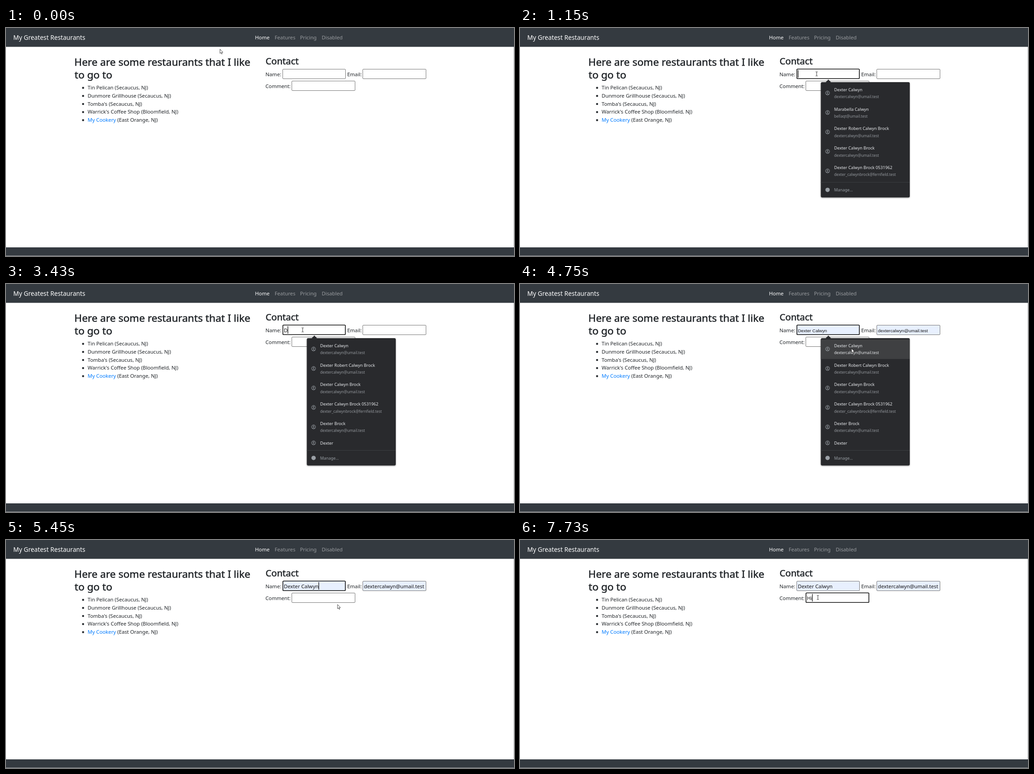
Recreate the animation shown at these times as an HTML page. Size 1117x501 px, loop 8 s.

```html
<!DOCTYPE html>
<html lang="en">
<head>
<meta charset="utf-8">
<title>Restaurants page</title>
<style>
  html, body { margin: 0; width: 100%; height: 100%; overflow: hidden; background: #fff; }
  svg { display: block; width: 1117px; height: 501px; }
  text { font-family: "Noto Sans", "Open Sans", sans-serif; font-size: 11.25px; fill: #212529; white-space: pre; }
  .head { font-weight: 500; stroke: #212529; stroke-width: .55px; }
  .preview { font-family: "Liberation Sans", Arial, sans-serif; font-size: 9.87px; }
  .popup { filter: drop-shadow(0 1px 1.5px rgba(0, 0, 0, .45)); }
</style>
</head>
<body>
<svg id="stage" viewBox="0 0 1117 501">
  <defs><clipPath id="mailClip"><rect x="785" y="90" width="137.5" height="22"/></clipPath></defs>
</svg>
<script>
const LOOP = 8000;
const stage = document.getElementById('stage');

function add(parent, tag, attrs = {}, content) {
  const el = document.createElementNS('http://www.w3.org/2000/svg', tag);
  for (const key in attrs) el.setAttribute(key, attrs[key]);
  if (content !== undefined) el.textContent = content;
  parent.append(el);
  return el;
}
const rect = (p, x, y, width, height, fill, more) => add(p, 'rect', { x, y, width, height, fill, ...more });
const label = (p, x, y, str, style = '', cls = '') => add(p, 'text', { x, y, style, class: cls }, str);
const show = (el, on) => { el.style.display = on ? '' : 'none'; };

// Page
rect(stage, 1116, 0, 1, 501, '#c9cbcd');
rect(stage, 0, 0, 1117, 41.4, '#343a40');
rect(stage, 0, 482, 1117, 18.5, '#343a40');
label(stage, 16, 26.3, 'My Greatest Restaurants', 'font-size:13.7px;fill:#fff');
[['Home', 547.5], ['Features', 590.7], ['Pricing', 646.5], ['Disabled', 694.3]].forEach(([str, x], i) =>
  label(stage, x, 25.3, str, `fill:${i ? '#999c9f' : '#fff'}`));

label(stage, 150.2, 82.7, 'Here are some restaurants that I like', 'font-size:22.55px', 'head');
label(stage, 150.8, 111.2, 'to go to', 'font-size:22.55px', 'head');
label(stage, 570.8, 80, 'Contact', 'font-size:20.1px', 'head');

['Tin Pelican (Secaucus, NJ)', 'Dunmore Grillhouse (Secaucus, NJ)', "Tomba's (Secaucus, NJ)",
 "Warrick's Coffee Shop (Bloomfield, NJ)", ' (East Orange, NJ)'].forEach((str, i) => {
  const y = 135.2 + i * 17.75;
  add(stage, 'circle', { cx: 169.5, cy: y - 3.7, r: 2.2, fill: '#212529' });
  const line = label(stage, 179.5, y, '');
  if (i === 4) add(line, 'tspan', { style: 'fill:#007bff' }, 'My Cookery');
  add(line, 'tspan', {}, str);
});

label(stage, 570.5, 105.5, 'Name:');
const mailMark = rect(stage, 750, 93, 31, 17, '#0078d7');
const mailLabel = label(stage, 750.3, 105.5, 'Email:');
label(stage, 570.5, 131.7, 'Comment:');

// Form fields
function makeField(x, y, width, clip) {
  const box = rect(stage, x + .5, y + .5, width - 1, 21, '#fff', { rx: 1.5, stroke: '#767676', 'stroke-width': 1 });
  const ring = rect(stage, x + .8, y + .3, width - 1.6, 21, 'none', { rx: 1.5, stroke: '#101010', 'stroke-width': 1.6 });
  const group = add(stage, 'g', clip ? { 'clip-path': `url(#${clip})` } : {});
  const text = label(group, x + 3, y + 15.6, '', 'fill:#151515');
  const caret = rect(stage, 0, y + 2.5, 1.2, 16.5, '#000');
  return (str, { filled, preview, focus, blink }) => {
    box.setAttribute('fill', filled ? '#e8f0fe' : '#fff');
    text.textContent = str;
    text.setAttribute('class', preview ? 'preview' : '');
    show(ring, focus);
    show(caret, blink);
    if (blink) caret.setAttribute('x', x + 3 + (str ? text.getComputedTextLength() : 0));
  };
}
const nameField = makeField(608, 90, 139);
const mailField = makeField(784, 90, 140, 'mailClip');
const commentField = makeField(628, 116, 140);

// Autofill popups
const NAME = 'Dexter Calwyn', MAIL = 'dextercalwyn@umail.test';
const people = {
  main: [NAME, MAIL],
  relative: ['Marabella Calwyn', 'bellaqt@umail.test'],
  full: ['Dexter Robert Calwyn Brock', MAIL],
  double: ['Dexter Calwyn Brock', MAIL],
  school: ['Dexter Calwyn Brock 0531962', 'dexter_calwynbrock@fernfield.test'],
  short: ['Dexter Brock', MAIL],
  first: ['Dexter']
};

function personIcon(p, x, y) {
  const g = add(p, 'g', { transform: `translate(${x} ${y})`, fill: 'none', stroke: '#9aa0a6' });
  add(g, 'circle', { r: 4.4 });
  add(g, 'circle', { cy: -1.2, r: 1.4 });
  add(g, 'path', { d: 'M-3 3.2Q0 .4 3 3.2' });
}

function makePopup(keys, bottom) {
  const g = add(stage, 'g', { class: 'popup' });
  add(g, 'path', { d: 'M671.5 120L678 113.2L684.5 120Z', fill: '#292a2d' });
  rect(g, 661.5, 119, 195.5, bottom - 119, '#292a2d', { rx: 3 });
  const hover = rect(g, 661.5, 122, 195.5, 42.8, '#3f4042');
  let firstMail;
  keys.forEach((key, i) => {
    const [who, mail] = people[key];
    const y = 138.8 + i * 42.8;
    personIcon(g, 676.3, mail ? y + 4 : y - 3.7);
    label(g, 690.7, mail ? y : y - .2, who, 'font-size:9.2px;fill:#e8eaed');
    if (mail) {
      const el = label(g, 690.7, y + 15.3, mail, 'font-size:8.4px;fill:#93979c');
      firstMail = firstMail || el;
    }
  });
  rect(g, 661.5, bottom - 33.7, 195.5, 1, '#3c4043');
  add(g, 'circle', { cx: 676.3, cy: bottom - 16.6, r: 4.8, fill: '#9aa0a6' });
  label(g, 690.7, bottom - 13.2, 'Manage…', 'font-size:8.9px;fill:#9aa0a6');
  return (on, hovered) => {
    show(g, on);
    show(hover, hovered);
    firstMail.style.fill = hovered ? '#e8eaed' : '#93979c';
  };
}
const popups = [
  makePopup(['main', 'relative', 'full', 'double', 'school'], 372.3),
  makePopup(['main', 'full', 'double', 'school', 'short', 'first'], 398.8)
];

// Pointers
const arrow = add(stage, 'path', {
  d: 'M.5 .5V9.8L2.6 7.9L4.1 11.2L5.5 10.6L4.1 7.4H6.9Z', fill: '#fff', stroke: '#222', 'stroke-width': .8
});
const beam = add(stage, 'path', {
  d: 'M-2.2 -4.5H-.6L0 -4L.6 -4.5H2.2M0 -4V4M-2.2 4.5H-.6L0 4L.6 4.5H2.2', fill: 'none', stroke: '#333', 'stroke-width': 1
});

// Each step changes part of the state and holds until the next
const steps = [
  [0, { arrow: [470, 46], beam: null, ring: '', caret: '', name: '', mail: '', comment: '', popup: 0, hover: false,
        preview: false, marked: false }],
  [130, { arrow: [549, 115] }],
  [330, { arrow: [460, 174] }],
  [455, { arrow: [600, 120] }],
  [580, { arrow: null, beam: [645, 99.5], ring: 'name', caret: 'name' }],
  [730, { beam: [652.3, 100.8] }],
  [880, { ring: '', caret: '', marked: true }],
  [1000, { ring: 'name', caret: 'name', marked: false }],
  [1150, { popup: 1 }],
  [1560, { caret: '' }],
  [2140, { caret: 'name' }],
  [2290, { name: 'D' }],
  [2410, { popup: 2 }],
  [2850, { caret: '' }],
  [3430, { caret: 'name' }],
  [3870, { caret: '' }],
  [4170, { beam: null, arrow: [704, 124] }],
  [4320, { arrow: [726, 143], hover: true, preview: true, name: NAME, mail: MAIL }],
  [4480, { arrow: [728.6, 142.5] }],
  [4630, { arrow: [728, 142] }],
  [4750, { arrow: [728.5, 141.2] }],
  [5330, { popup: 0, hover: false, preview: false, caret: 'name' }],
  [5720, { arrow: [721, 144] }],
  [5870, { arrow: [674, 146.5], caret: '' }],
  [6040, { arrow: null, beam: [655, 133] }],
  [6190, { beam: [655, 126.3] }],
  [6310, { ring: 'name comment' }],
  [6460, { ring: 'comment', caret: 'comment' }],
  [7010, { caret: '' }],
  [7440, { comment: 'H', caret: 'comment' }],
  [7730, { comment: 'Hi' }]
];
let state = {};
const states = steps.map(([, change]) => (state = { ...state, ...change }));

function place(el, pos) {
  show(el, pos);
  if (pos) el.setAttribute('transform', `translate(${pos})`);
}

function draw(s) {
  const look = id => ({ focus: s.ring.includes(id), blink: s.caret === id, preview: s.preview });
  nameField(s.name, { ...look('name'), filled: s.mail });
  mailField(s.mail, { ...look('mail'), filled: s.mail });
  commentField(s.comment, { ...look('comment'), preview: false });
  show(mailMark, s.marked);
  mailLabel.style.fill = s.marked ? '#fff' : '';
  popups.forEach((set, i) => set(s.popup === i + 1, s.hover));
  place(arrow, s.arrow);
  place(beam, s.beam);
}

const start = performance.now();
let current = -1;
function tick(now) {
  const t = Math.max(0, now - start) % LOOP;
  const i = steps.findLastIndex(([at]) => at <= t);
  if (i !== current) draw(states[current = i]);
  requestAnimationFrame(tick);
}
tick(start);
</script>
</body>
</html>
```
